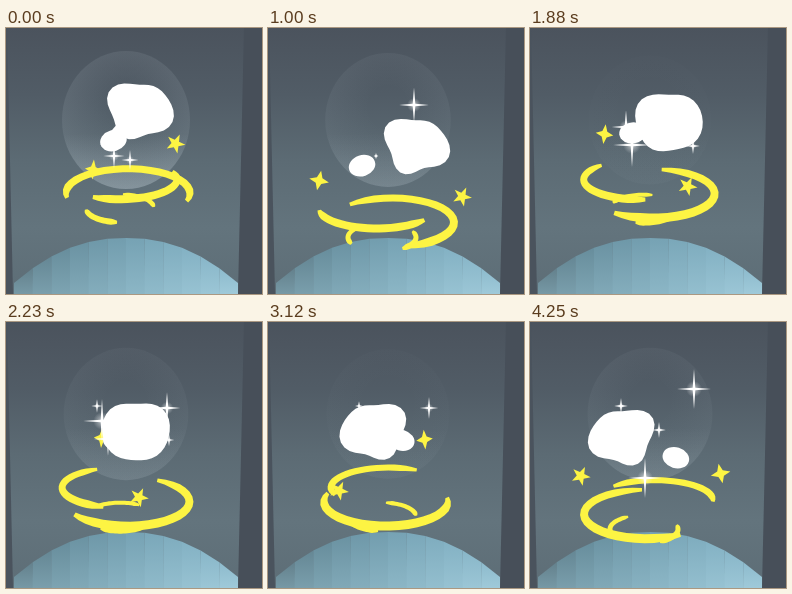
Animation of 256 by 266 pixels, one loop 4.27 s. Source, as an HTML page with a canvas:

```html
<!DOCTYPE html>
<html lang="en">
<head>
<meta charset="utf-8">
<title>Magic swirl</title>
<style>
html, body { margin: 0; width: 100%; height: 100%; overflow: hidden; background: #4a525c; }
canvas { display: block; }
</style>
</head>
<body>
<canvas id="stage" width="256" height="266"></canvas>
<script>
const ctx = document.getElementById('stage').getContext('2d');
const { sin, cos, abs, min, PI, hypot } = Math;
const LOOP = 4270, YELLOW = '#fdf443', TAU = PI * 2, RAD = PI / 180;

// Sparkles: x, y, size, time of full brightness
const sparkles = [
  [124, 132, 10, 0], [108, 128, 15, 300], [146, 77, 23, 640], [163, 130, 6, 1000],
  [102, 117, 22, 1880], [163, 118, 8, 1880], [96, 99, 22, 2240], [161, 86, 21, 2600],
  [91, 84, 9, 2600], [164, 67, 24, 3950], [115, 156, 20, 4200], [129, 108, 8, 4250], [91, 84, 8, 4250]
];

function gradient(x0, y0, x1, y1, ...stops) {
  const g = ctx.createLinearGradient(x0, y0, x1, y1);
  stops.forEach((c, i) => g.addColorStop(i / (stops.length - 1), c));
  return g;
}

function polygon(points, fill) {
  ctx.beginPath();
  points.forEach(p => ctx.lineTo(...p));
  ctx.closePath();
  ctx.fillStyle = fill;
  ctx.fill();
}

function drawScene() {
  ctx.fillStyle = gradient(0, 0, 0, 266, '#4b535d', '#515c66', '#5c6b74', '#63747d', '#5d6d76');
  ctx.fillRect(0, 0, 256, 266);
  // Faceted dome, brighter to the right and towards the bottom
  const facets = 12;
  const rim = i => {
    const u = i / facets * 2 - 1;
    return [120 + 112 * u, 210 + 45 * abs(u) ** 2.2];
  };
  for (let i = 0; i < facets; i++) {
    const [x0, y0] = rim(i), [x1, y1] = rim(i + 1);
    polygon([[x0, y0], [x1, y1], [x1 + .5, 266], [x0, 266]],
      gradient(0, min(y0, y1), 0, 270,
        `hsl(197 ${17 + 2 * i}% ${47 + 1.9 * i}%)`, `hsl(196 ${22 + 2 * i}% ${57 + 1.6 * i}%)`));
  }
  polygon([[238, 0], [256, 0], [256, 266], [232, 266]], '#474f59');
  polygon([[0, 0], [1, 0], [7, 266], [0, 266]], '#4a535d');
}

function drawBubble(t) {
  const power = .53 + .47 * cos(t / 1300 * TAU);
  ctx.save();
  ctx.globalAlpha = power;
  ctx.translate(120, 92);
  ctx.scale(61 + 3 * power, 64 + 5 * power);
  const g = ctx.createRadialGradient(0, -.2, .3, 0, 0, 1);
  g.addColorStop(0, 'rgba(205,218,226,0)');
  g.addColorStop(1, 'rgba(205,218,226,.1)');
  ctx.beginPath();
  ctx.arc(0, 0, 1, 0, TAU);
  ctx.fillStyle = g;
  ctx.fill();
  ctx.fillStyle = gradient(0, .2, 0, 1, 'rgba(205,218,226,0)', 'rgba(205,218,226,.27)');
  ctx.fill();
  ctx.restore();
}

// Tapered band along an ellipse, wider at the front; angles in degrees
function drawRibbon(cx, cy, rx, ry, mid, half, width) {
  const n = 24, left = [], right = [];
  for (let i = 0; i <= n; i++) {
    const u = i / n, a = (mid + half * (2 * u - 1)) * RAD, c = cos(a), s = sin(a);
    const w = (width + s) / 2 * min(1, .5 + 5 * u * (1 - u)) / hypot(rx * s, ry * c);
    const x = cx + rx * c, y = cy + ry * s, nx = ry * c * w, ny = rx * s * w;
    left.push([x - nx, y - ny]);
    right.unshift([x + nx, y + ny]);
  }
  polygon([...left, ...right], YELLOW);
}

function drawStar(x, y, tips, turn, squash) {
  const points = [];
  for (let i = 0; i < tips * 2; i++) {
    const a = turn * RAD + i * PI / tips - PI / 2, r = i % 2 ? 4 : 10;
    points.push([x + cos(a) * r * squash, y + sin(a) * r]);
  }
  polygon(points, YELLOW);
}

function drawBlobs(spin, bob) {
  const c = cos(spin * RAD), s = sin(spin * RAD), side = cos((spin + 25) * RAD);
  const cx = 120 + 28 * c, cy = 88 + 7 * s + bob;
  const x = 120 - 26 * c, y = 108 - 5 * s + bob;
  // Lumpy outline: the odd terms flip as the blob turns its other side
  const outline = [];
  for (let i = 0; i < 36; i++) {
    const a = i / 36 * TAU;
    const r = 32 - 3 * side * side + 2.7 * cos(2 * a) - .9 * sin(3 * a) - cos(4 * a)
      + side * (1.7 * sin(2 * a) + 2.5 * cos(3 * a) + 2.5 * sin(4 * a));
    outline.push([cx + r * cos(a), cy + r * sin(a)]);
  }
  polygon(outline, '#fff');
  ctx.beginPath();
  ctx.ellipse(x, y, 13.5, 10.5, -20 * side * RAD, 0, TAU);
  ctx.fill();
  // The two blobs melt together while they are close
  const dx = cx - x, dy = cy - y, gap = hypot(dx, dy), k = 8 / gap;
  if (gap < 43) {
    polygon([[x - dy * k, y + dx * k], [cx - dy * k, cy + dx * k],
      [cx + dy * k, cy - dx * k], [x + dy * k, y - dx * k]], '#fff');
  }
}

function drawSparkle([x, y, size, peak], t) {
  const s = size * cos(min(1, abs(t - peak) / 800) * PI / 2);
  if (s < 1.5) return;
  const glow = ctx.createRadialGradient(x, y, 0, x, y, s * .4);
  glow.addColorStop(0, 'rgba(255,255,255,.6)');
  glow.addColorStop(1, 'rgba(255,255,255,0)');
  ctx.fillStyle = glow;
  ctx.fillRect(x - s, y - s, s * 2, s * 2);
  const w = min(1.3, .6 + s * .04), h = s * .85;
  polygon([[x, y - s], [x + w, y - w], [x + h, y], [x + w, y + w],
    [x, y + s], [x - w, y + w], [x - h, y], [x - w, y - w]], '#fff');
}

function frame(t) {
  // Everything circles one axis and floats up and down together
  const spin = (t - 1050) * .0582, bob = 15 * (1 - cos((t - 50) / 1750 * TAU));
  const c = cos(spin * RAD), s = sin(spin * RAD), lead = (spin + 12) * RAD;
  drawScene();
  drawBubble(t);
  drawRibbon(114, 180 + bob, 34, 14, spin + 16, 40, 5);
  drawRibbon(114, 180 + bob, 34, 14, spin + 196, 40, 5);
  drawRibbon(117 - 8 * c, 151 + bob, 58, 20, spin + 108, 70, 7);
  drawRibbon(120 + 4 * c, 165 + bob, 62, 24.5, spin - 25, 105, 8);
  drawStar(121 - 70 * c, 122 - 22 * s + bob, 4, 12 * c, .65 + .35 * abs(c));
  drawStar(121 + 74 * cos(lead), 135 + 26 * sin(lead) + bob, 5, 25, 1);
  drawBlobs(spin, bob);
  sparkles.forEach(p => drawSparkle(p, t));
}

const start = performance.now();
function tick() {
  frame((performance.now() - start) % LOOP);
  requestAnimationFrame(tick);
}
tick();
</script>
</body>
</html>
```
